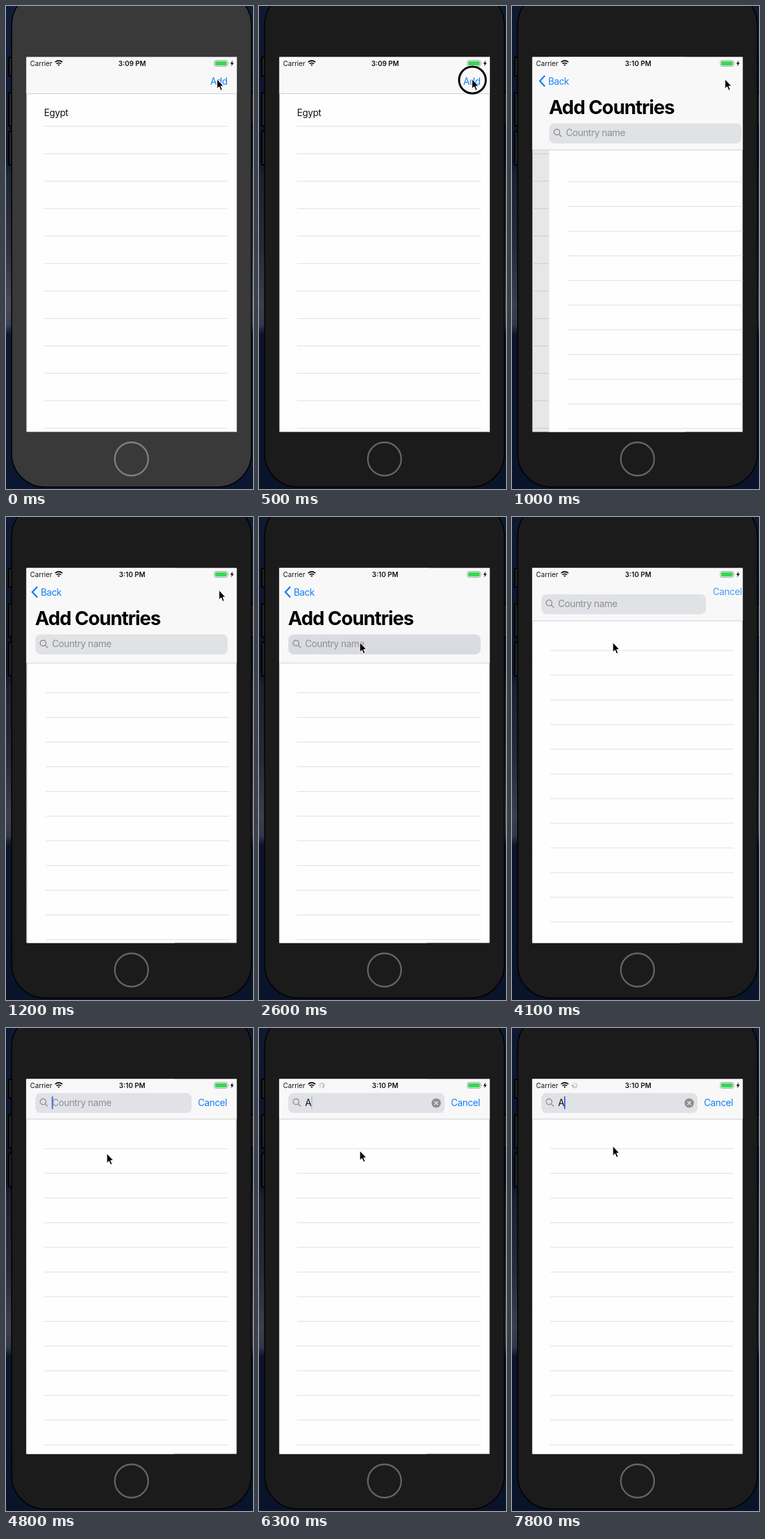
These frames come from a looping animation (370x724 px, 8000 ms). An HTML page:

```html
<!DOCTYPE html>
<html lang="en">
<head>
<meta charset="utf-8">
<title>Add Countries</title>
<style>
  html, body { margin: 0; width: 100%; height: 100%; overflow: hidden; background: #0d1730; }
  svg { display: block; width: 370px; height: 724px; }
  text { font: 14px Inter, Roboto, sans-serif; letter-spacing: -.4px; fill: #111; }
  .status { font-size: 10.2px; letter-spacing: 0; }
  .bold { font-weight: 600; text-anchor: middle; }
  .title { font-size: 28.6px; font-weight: 700; letter-spacing: -1px; fill: #000; }
  .link { fill: #147efb; }
  .hint { fill: #8e8e93; }
  .line { stroke: #dfdfe2; stroke-width: 1; fill: none; }
</style>
</head>
<body>
<svg viewBox="0 0 370 724">
  <defs>
    <linearGradient id="sky" x2="0" y2="1">
      <stop offset="0" stop-color="#101d3b"/>
      <stop offset=".32" stop-color="#0d1832"/>
      <stop offset=".35" stop-color="#20263a"/>
      <stop offset=".5" stop-color="#2c3145"/>
      <stop offset=".62" stop-color="#454a5f"/>
      <stop offset=".66" stop-color="#3c4156"/>
      <stop offset=".68" stop-color="#0d1833"/>
      <stop offset="1" stop-color="#0b1630"/>
    </linearGradient>
    <clipPath id="screen"><rect x="30.500" y="76.500" width="315" height="562"/></clipPath>
    <clipPath id="barClip"><rect id="barClipRect" x="30" y="76" width="316"/></clipPath>
  </defs>

  <rect width="370" height="724" fill="url(#sky)"/>
  <rect id="shade" width="370" height="724" fill="#000" opacity="0"/>
  <g fill="#222" stroke="#000" stroke-width="2">
    <rect x="4" y="77" width="7" height="28" rx="1"/>
    <rect x="4" y="130" width="7" height="50" rx="1"/>
    <rect x="4" y="188" width="7" height="50" rx="1"/>
    <rect x="365" y="130" width="7" height="50" rx="1"/>
  </g>
  <rect id="body" x="8.500" y="-22" width="359" height="743" rx="50" stroke="#000" stroke-width="1.500"/>
  <circle id="home" cx="188" cy="679" r="25" fill="none" stroke-width="2.300"/>
  <rect x="30" y="76" width="316" height="563" fill="#000"/>

  <g clip-path="url(#screen)">
    <g id="oldList">
      <rect x="30" y="76" width="316" height="563" fill="#fefefe"/>
      <text x="57" y="165">Egypt</text>
      <path id="oldLines" class="line"/>
    </g>
    <rect id="dim" x="30" y="76" width="316" height="563" fill="#000"/>
    <g id="newList">
      <rect x="30" y="76" width="316" height="660" fill="#fefefe"/>
      <path id="newLines" class="line"/>
    </g>

    <rect id="bar" x="30" y="76" width="316" fill="#f8f8f8"/>
    <path id="barEdge" d="M30 .5H346" stroke="#cfcfd2"/>
    <g clip-path="url(#barClip)">
      <text id="add" class="link" x="306" y="118">Add</text>
      <g id="back">
        <path d="M47 104.500 39.500 112.500 47 120.500" fill="none" stroke="#147efb" stroke-width="2.400"/>
        <text class="link" x="52" y="118">Back</text>
      </g>
      <text id="title" class="title" x="43.500" y="161.500">Add Countries</text>
      <g id="search">
        <rect id="field" x="44" y="176" height="30" rx="8"/>
        <g fill="none" stroke="#8e8e93" stroke-width="1.400">
          <circle cx="55.500" cy="189" r="4.300"/><path d="M58.700 192.200 62.500 196"/>
        </g>
        <text id="query" x="69" y="195"></text>
        <rect id="caret" y="181" width="2" height="19" fill="#4268e8"/>
        <g id="clear">
          <circle cx="265.500" cy="191" r="7" fill="#8e8e93"/>
          <path d="m262.800 188.300 5.400 5.400m0-5.400-5.400 5.400" stroke="#e8e8ec" stroke-width="1.300"/>
        </g>
      </g>
      <text id="cancel" class="link" x="287.500" y="117">Cancel</text>
    </g>

    <text class="status" x="36" y="90">Carrier</text>
    <g fill="none" stroke="#111" stroke-width="1.700">
      <path d="M73.500 84.200Q79 79.800 84.500 84.200M75.500 86.700Q79 83.900 82.500 86.700"/>
      <path d="M79 90 77.300 88Q79 86.900 80.700 88Z" fill="#111" stroke="none"/>
    </g>
    <g id="spinner" stroke="#555" stroke-width="1"></g>
    <text id="clock" class="status bold" x="189" y="90"></text>
    <rect x="312" y="81.500" width="20" height="9" rx="2.500" fill="#fff" stroke="#999" stroke-width=".8"/>
    <rect x="313.300" y="82.800" width="17.400" height="6.400" rx="1.300" fill="#3bd557"/>
    <path d="M333 84.500q1.500 1.500 0 3z" fill="#999"/>
    <path d="M339.500 81.500 336 86.700h2.200L337.200 90.500 341.300 85.200H339Z" fill="#111"/>
  </g>

  <circle id="click" cx="319.700" cy="111" r="20" fill="none" stroke="#000" stroke-width="3"/>
  <path id="cursor" d="M0 0V14.500L3.300 11.500 5.600 17 8 16 5.800 10.600H10Z" stroke="#fff" stroke-width="1"/>
</svg>

<script>
const LOOP = 8000, STEP = 100, SCREEN_W = 314, BAR_TOP = 76;
const $ = id => document.getElementById(id);
const set = (id, attrs) => {
  for (const name in attrs) $(id).setAttribute(name, attrs[name]);
};
const shift = (id, x, y = 0) => set(id, { transform: `translate(${x} ${y})` });
const fade = (id, opacity) => set(id, { opacity });
const clamp = v => Math.min(1, Math.max(0, v));
const mix = (a, b, p) => a + (b - a) * p;
const ramp = (t, from, to) => clamp((t - from) / (to - from));
const smooth = (t, from, to) => {
  const p = ramp(t, from, to);
  return p * p * (3 - 2 * p);
};
// Critically damped spring, falling from 1 to 0
const spring = (t, start, speed) => {
  const x = Math.max(0, t - start) / 1000 * speed;
  return (1 + x) * Math.exp(-x);
};
const rows = (first, gap, count) =>
  Array.from({ length: count }, (_, i) => `M57 ${(first + i * gap).toFixed(1)}H332`).join("");

set("oldLines", { d: rows(180.3, 41.15, 12) });
set("newLines", { d: rows(263.4, 37, 14) });
$("spinner").innerHTML = Array.from({ length: 8 }, (_, i) =>
  `<path d="M0-2V-4.500" opacity="${.25 + i * .09}" transform="rotate(${i * 45})"/>`).join("");

function caretOpacity(t) {
  if (t < 4800) return 0;
  const phase = t % 1000;
  return phase < 500 ? 1 - ramp(phase, 0, 400) : ramp(phase, 500, 800);
}

function cursorAt(t) {
  const move = smooth(t, 1850, 2600);
  const start = mix(316, 319, ramp(t, 0, 200));
  return [mix(start, 151, move), mix(109.5, 188, move) - 11 * smooth(t, 5950, 6800)];
}

function draw(t) {
  const active = t >= 500, typed = t >= 5100;
  const slide = spring(t, 700, 13.8);
  const barSlide = t >= 1200 ? 0 : spring(t, 700, 17);
  const collapse = smooth(t, 3880, 4200);
  const lift = -collapse * 78.5;
  const barBottom = mix(218.5, 131, barSlide) - collapse * 82.5;

  set("body", { fill: active ? "#1b1b1b" : "#393939" });
  set("home", { stroke: active ? "#656565" : "#808080" });
  fade("shade", active ? .15 : 0);
  fade("click", t >= 500 && t < 700 ? 1 : 0);
  $("clock").textContent = t < 700 ? "3:09 PM" : "3:10 PM";

  shift("oldList", -SCREEN_W * .3 * (1 - slide));
  fade("dim", .1 * (1 - slide));
  shift("newList", SCREEN_W * slide, -collapse * 82.5);

  set("bar", { height: barBottom - BAR_TOP });
  set("barClipRect", { height: barBottom - BAR_TOP });
  shift("barEdge", 0, barBottom);
  fade("add", ramp(barSlide, .3, 1));
  shift("back", 60 * barSlide, lift);
  fade("back", (1 - barSlide) * (1 - ramp(collapse, .02, .4)));
  shift("title", SCREEN_W * barSlide, lift);
  fade("title", 1 - ramp(collapse, .02, .7));

  shift("search", SCREEN_W * barSlide, lift);
  const pressed = t >= 2600 ? 1 - ramp(t, 2700, 3300) : 0;
  set("field", {
    width: mix(288, 234, collapse),
    fill: `rgb(${mix(225, 218, pressed)},${mix(226, 219, pressed)},${mix(230, 225, pressed)})`
  });
  $("query").textContent = typed ? "A" : "Country name";
  set("query", { class: typed ? "" : "hint" });
  set("caret", { x: typed ? 78 : 68.5 });
  fade("caret", caretOpacity(t));
  fade("clear", typed ? 1 : 0);
  shift("cancel", 57 * (1 - collapse));
  fade("cancel", ramp(collapse, .02, 1));

  fade("spinner", typed ? 1 : 0);
  const turn = Math.floor((t - 100) / 500) * 45;
  set("spinner", { transform: `translate(94 86) rotate(${turn})` });
  shift("cursor", ...cursorAt(t));
}

const begin = performance.now();
function tick() {
  const t = (performance.now() - begin) % LOOP;
  draw(Math.floor(t / STEP) * STEP);
  requestAnimationFrame(tick);
}
tick();
</script>
</body>
</html>
```
